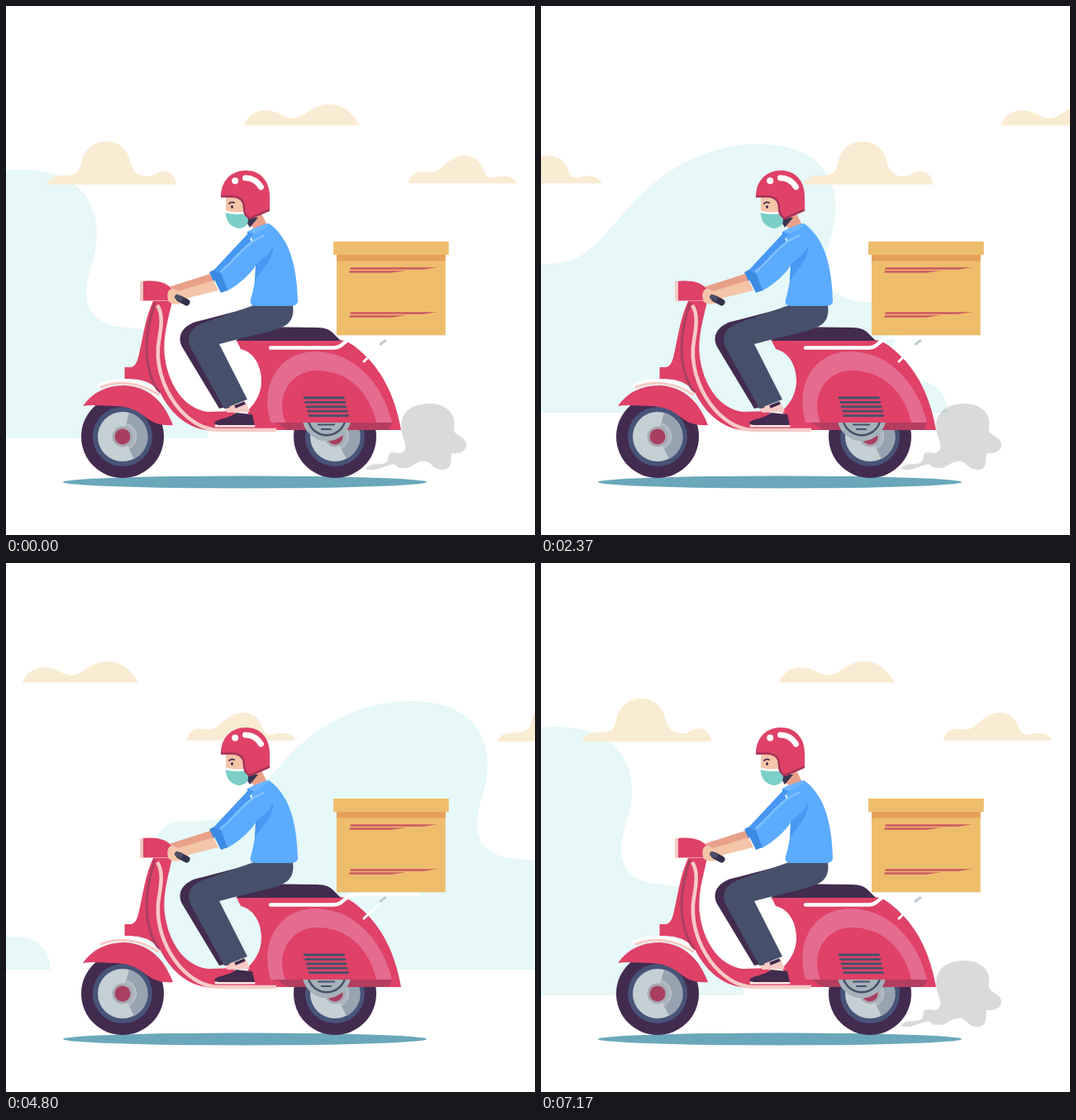
An HTML page with a canvas that plays this animation: 640 by 640 pixels, repeating every 7.21 s.

```html
<!DOCTYPE html>
<html lang="en">
<head>
<meta charset="utf-8">
<title>Scooter delivery</title>
<style>
html, body { margin: 0; width: 100%; height: 100%; overflow: hidden; background: #fff; }
canvas { display: block; width: 100vw; height: 100vh; }
</style>
</head>
<body>
<canvas id="stage" width="640" height="640"></canvas>
<script>
const ctx = document.getElementById('stage').getContext('2d');
const LOOP = 7210, STEP = 40, CYCLE = 7160, HALF = CYCLE / 2, PUFF = CYCLE / 4;
const CLOUD_WRAP = 813, HILL_WRAP = 664;

const C = {
  red: '#df4167', pink: '#e56b8f', wine: '#a83f60', cream: '#f7cbc5',
  plum: '#432b4f', navy: '#46506b', blue: '#475478', steel: '#c5d0d5', grey: '#97a3b0',
  shirt: '#5babff', fold: '#4797f3', cuff: '#3d8ae2', skin: '#f4c5a8', tan: '#e9a08a',
  box: '#eebd6c', rim: '#e7a05b', tape: '#cd5962', mint: '#e6f8f8', cloud: '#faecd2'
};

function fill(d, color) {
  ctx.fillStyle = color;
  ctx.fill(typeof d === 'string' ? new Path2D(d) : d);
}

function line(d, color, width, cap = 'round') {
  ctx.strokeStyle = color;
  ctx.lineWidth = width;
  ctx.lineCap = cap;
  ctx.lineJoin = 'round';
  ctx.stroke(new Path2D(d));
}

function disc(x, y, rx, color, ry = rx) {
  ctx.fillStyle = color;
  ctx.beginPath();
  ctx.ellipse(x, y, rx, ry, 0, 0, Math.PI * 2);
  ctx.fill();
}

function rect(x, y, w, h, color) {
  ctx.fillStyle = color;
  ctx.fillRect(x, y, w, h);
}

function at(x, y, draw, angle = 0) {
  ctx.save();
  ctx.translate(x, y);
  ctx.rotate(angle);
  draw();
  ctx.restore();
}

// Drawn at its highest point of the arc
const hill = new Path2D(`M47 486C46 468 48 449 75 449C99 448 105 437 106 414L106 352
  C106 321 116 306 145 306C186 307 203 302 231 270L266 231C305 189 358 161 418 161
  C476 161 510 190 510 238C510 268 497 285 497 312C498 335 514 350 545 352
  C574 352 590 364 590 377C589 396 574 405 574 420C575 439 588 446 608 447
  C630 448 645 462 645 486Z`);

const clouds = [
  { x: 50, w: 156, path: new Path2D(`M50 216C52 207 60 205 73 205C85 205 89 200 91 190
    C95 173 106 164 121 164C137 164 147 174 150 187C153 199 158 205 169 206
    C180 207 180 200 191 200C201 201 205 206 206 216Z`) },
  { x: 288, w: 140, path: new Path2D(`M288 144.5C294 129 309 122 328 129C343 136 347 139 361 131
    C371 124 379 119 391 119C409 119 420 131 428 144.5Z`) },
  { x: 486.5, w: 132, path: new Path2D(`M486.5 214.5C490 202 498 199 509 201C518 203 523 199 531 192
    C539 185 546 181 554 181C567 181 575 189 578 199C581 209 589 209 596 206
    C605 204 615 207 618.5 214.5Z`) }
];

// Origin at the tip of the tail
const smoke = new Path2D(`M0 0C7 -9 15 -4 23 -7C32 -11 23 -19 33 -20C39 -20 43 -16 48 -24
  C50 -32 43 -39 43 -52C43 -70 58 -79 77 -79C98 -79 110 -66 107 -51C104 -39 122 -41 122 -29
  C122 -20 111 -18 104 -19C103 -9 105 1 93 1C80 1 79 -11 70 -9C59 -9 57 0 45 -1
  C34 -1 40 -7 31 -5C19 -3 14 4 0 0Z`);

function drawHills(t) {
  const u = t / CYCLE;
  const arc = Math.pow(Math.max(0, Math.sin(Math.PI * u)), 1.2);
  const x = HILL_WRAP * u + 33 * arc - 400;
  const y = 37 * (1 - arc);
  ctx.globalAlpha = Math.min(1, Math.max(0, (6500 - t) / 600));
  at(x, y, () => fill(hill, C.mint));
  ctx.globalAlpha = 1;
  at(x - HILL_WRAP, y, () => fill(hill, C.mint));
}

function drawClouds(t) {
  const shift = CLOUD_WRAP * t / CYCLE;
  for (const { x, w, path } of clouds) {
    const left = (x + shift + w) % CLOUD_WRAP - w;
    at(left - x, 0, () => fill(path, C.cloud));
  }
}

function drawSmoke(t) {
  const pose = Math.floor(t % PUFF / (PUFF / 3));
  if (pose > 1) return;
  at(435, 560, () => fill(smoke, 'rgba(0,0,0,.145)'), pose * -0.088);
}

function wheel(x, y) {
  at(x, y, () => {
    disc(0, 0, 50, C.plum);
    disc(0, 0, 36, C.blue);
    disc(0, 0, 30, C.steel);
    fill('M8 -29A30 30 0 0 1 14 27L0 0Z', C.grey);
    disc(0, 0, 17, C.steel);
    fill('M4 -16A17 17 0 0 1 8 15L0 0Z', '#adb7c0');
    disc(0, 0, 12.5, '#a9a9b3');
    disc(0, 0, 9.5, C.wine);
  });
}

function rearBody() {
  fill(`M279 405L284 415C301 419 309 437 309 453C309 472 298 484 292 490L301 513L478 513
    C471 473 455 439 427 416C419 409 413 405 404 404Z`, C.red);
  fill('M320 504C306 455 333 418 374 418C420 418 455 455 467 504Z', C.pink);
  fill('M338 504C325 470 346 441 376 441C414 441 440 468 448 504Z', C.red);
  fill('M328 504L467 504L463 513L340 513Z', '#b43d60');
  for (let i = 0; i < 5; i++) {
    const y = 474 + 5.4 * i, x = 361 + 1.5 * i;
    line(`M${x} ${y}h${47.5 - i * 0.2}`, C.navy, 2.8);
  }
  ctx.save();
  ctx.beginPath();
  ctx.rect(355, 504, 70, 30);
  ctx.clip();
  disc(388, 497, 29.5, '#a6b2ba');
  line('M366 503A23 23 0 0 0 410 503', C.navy, 2.5);
  line('M378 506.5H397M382 512H393', C.navy, 2.2);
  ctx.restore();
  line('M433 430L460 404', '#fff', 3);
  line('M452 410L460 404', '#bfcbd0', 3, 'butt');
  line('M320 413.5L396 413.5C409 414 409 401 424 401L499 401', '#fff', 4.5);
  fill('M278 405L300 388L376 389C387 389 392 392 396 396L405 405Z', C.plum);
}

function frontBody() {
  fill(`M178 357L201 357C195 385 190 399 192 424C196 456 214 487 244 491L277 490
    C277 496 270 501 262 503L300 505L327 514L250 514C215 512 196 487 186 467
    C174 452 159 451 143.5 451L143.5 437L151 437C157 436 159 430 161 421C166 400 168 379 178 357Z`, C.red);
  line('M180 359C172 385 165 415 175 447C178 456 182 463 186 468', C.wine, 3, 'butt');
  line('M183 362C192 376 186 394 184 413C182 443 195 471 211 489C224 503 239 513 258 513L327 513',
    C.cream, 4.5, 'butt');
  line('M113 459C134 449 163 453 183 469', '#fff', 5);
  line('M115 461C137 452 163 456 184 470', C.cream, 3);
  fill(`M93 484C105 467 122 459 143 459C168 460 189 473 202 507C189 508 179 505 171 499
    C159 489 147 484 131 484C119 484 106 482 93 484Z`, C.red);
  rect(162, 333, 4.5, 24, C.cream);
  fill('M166 333C184 331 196 335 203 345L199 356.5L166 356.5Z', C.red);
}

function legs() {
  fill('M299 364L238 380C214 384 205 399 214 414L258 487L273 484L235 405Z', C.plum);
  fill('M263 485L290 479L295 491L268 492Z', C.cream);
  line('M264 485L270 484M277 485L289 480', C.plum, 4, 'butt');
  line('M254 508L300 508', '#fbe4e0', 3);
  fill('M252 505C253 499 270 500 278 492L298 494L301 507L257 507Z', C.plum);
  fill(`M300 362L347 362C350 384 337 389 318 394C298 399 276 404 258 409L292 476L264 487
    L225 416C216 400 224 388 240 383Z`, C.navy);
}

function torso() {
  fill('M197 340L247 324L252 333L212 347Z', C.tan);
  fill('M293 275L251 320L258 329L302 300Z', C.fold);
  fill('M246 322L252 319L260 328L251 333Z', C.cuff);
  fill(`M318 263C344 281 352 317 353 357C353 362 348 363 341 363L304 363C296 363 295 360 296 355
    C301 338 302 327 302 314C296 324 282 337 267 345L256 324C273 312 287 294 299 284L294 277L302 265Z`, C.shirt);
  fill('M302 313C312 305 320 299 323 290C324 306 313 314 301 333Z', C.fold);
  line('M260 321C279 306 288 287 312 278', '#7fc0ff', 2.5);
  fill('M292 273L313 262L319 266L299 277L292 284Z', '#6db5ff');
  fill('M292 273L300 276L292 284Z', C.fold);
  fill('M254 322L260 323L268 344L260 347L253 333Z', C.cuff);
  fill('M208 345L251 332L257 344L221 353C216 362 202 362 197 358C194 351 195 344 200 342Z', C.skin);
  line('M210 354L218.5 358.5', '#32304a', 8);
  line('M207 352L211 354', '#4b4d68', 6);
}

function head() {
  fill('M297 254L309 251L315 263L300 269L294 264Z', C.tan);
  fill('M266 231L290 231L296 256L270 254L266 247Z', C.skin);
  fill('M287 255L305 256L295 268Z', '#3a3551');
  fill('M265.5 249C274 251 281 251 291 252C296 262 291 269 281 269C271 267 266 260 265.5 249Z', '#7bcfc8');
  line('M266 249C274 251 282 251 289 250', '#fff', 2.5);
  line('M270 239C272 237 274 237 276 238', C.plum, 1.8);
  disc(273.5, 243, 1.4, C.plum, 2);
  fill(`M260 231C260 211 273 199 290 199C308 199 319 212 319 230L319 247L295 258
    C287 255 289 249 288 241C286 234 281 231 272 231Z`, C.red);
  line('M261 230.5L274 230.5C284 231 288 236 288 244C288 251 290 254 295 257L318 247', '#a63258', 2.5);
  disc(277.2, 211.5, 4, '#fff');
  line('M289.5 208C298 208 304 212 308.5 219', '#fff', 7);
}

function parcel(t) {
  rect(400, 301, 131.7, 97.3, C.box);
  rect(400, 301, 131.7, 7.5, C.rim);
  for (const y of [316.2, 370.2]) {
    fill(`M417 ${y}H522L505 ${y + 2.6}H416Z`, C.tape);
    fill(`M416 ${y + 4}H484L466 ${y + 6.6}H415Z`, C.tape);
  }
  const open = Math.max(0, 1 - Math.abs(t % HALF - HALF / 2) / 183);
  at(465.9, 293, () => rect(-69.8, -8, 139.6, 16, C.box), open * 16.5 * Math.PI / 180);
}

function draw(t) {
  rect(0, 0, 640, 640, '#fff');
  drawHills(t);
  drawClouds(t);
  drawSmoke(t);
  disc(289, 576, 220, '#6ba7bb', 7.5);
  wheel(141, 521);
  wheel(398, 521);
  rearBody();
  frontBody();
  legs();
  torso();
  head();
  parcel(t);
}

const start = performance.now();
function tick() {
  const t = (performance.now() - start) % LOOP;
  draw(t < CYCLE ? Math.floor(t / STEP) * STEP : 0);
  requestAnimationFrame(tick);
}
tick();
</script>
</body>
</html>
```
